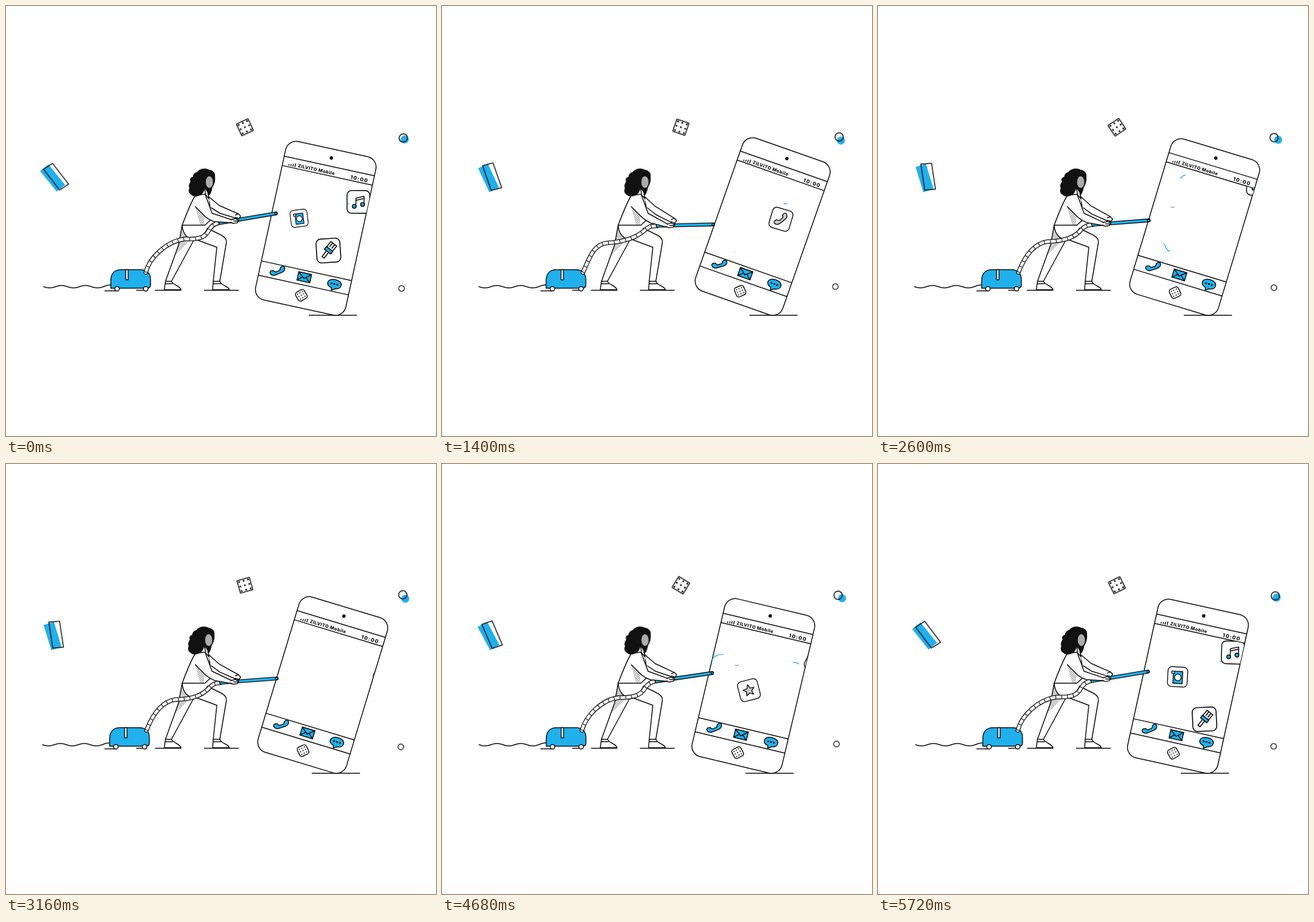
These frames come from a looping animation (720x720 px, 5760 ms). An HTML page:

```html
<!DOCTYPE html>
<html lang="en">
<head>
<meta charset="utf-8">
<title>Phone cleanup</title>
<style>
html, body { margin: 0; width: 100%; height: 100%; overflow: hidden; background: #fff; }
svg { display: block; width: 100%; height: 100%; }
.line { fill: none; stroke: #0c0c0c; stroke-width: 1.5; stroke-linecap: round; stroke-linejoin: round; }
.white { fill: #fff; }
.blue { fill: #20b0ec; }
.dots { fill: url(#dots); }
.ink { fill: #111; stroke: none; }
.flat { stroke: none; }
.flap { fill: var(--flap, #20b0ec); }
#apps { --flap: #fff; }
text { font: 800 7.6px Inter, "Open Sans", sans-serif; fill: #111; stroke: none; letter-spacing: .45px; }
.clock { font-size: 8.6px; letter-spacing: 1.2px; }

.card, .shade, .drift { animation: 5760ms infinite; }
.card { animation-name: card; }
.shade { animation-name: shade; }
.drift { animation-name: drift; }
.die { animation: die 5760ms linear infinite; }
.orbit { animation: orbit 1920ms linear infinite; }
.slow { animation-duration: 2880ms; }

@keyframes card {
  0%, 100% { transform: rotate(-37.6deg); animation-timing-function: cubic-bezier(.167, .167, .667, 1); }
  50% { transform: rotate(-8deg); animation-timing-function: cubic-bezier(.333, 0, .833, .833); }
}
@keyframes shade {
  0%, 100% { transform: rotate(-39deg); animation-timing-function: cubic-bezier(.167, .167, .667, 1); }
  50% { transform: rotate(-16.5deg); animation-timing-function: cubic-bezier(.333, 0, .833, .833); }
}
@keyframes drift {
  0%, 100% { transform: none; animation-timing-function: cubic-bezier(.167, .167, .667, 1); }
  50% { transform: translateX(var(--d)); animation-timing-function: cubic-bezier(.333, 0, .833, .833); }
}
@keyframes die { from { transform: rotate(-25deg); } to { transform: rotate(155deg); } }
@keyframes orbit { from { transform: rotate(43deg); } to { transform: rotate(403deg); } }
</style>
</head>
<body>
<svg viewBox="0 0 720 720">
  <defs>
    <pattern id="dots" width="3.4" height="3.4" patternUnits="userSpaceOnUse">
      <rect width="3.4" height="3.4" fill="#fff"/>
      <circle cx=".9" cy=".9" r=".62"/><circle cx="2.6" cy="2.6" r=".62"/>
    </pattern>
    <clipPath id="screen"><rect id="screenBox" x="-136" y="-209" width="154" height="163"/></clipPath>

    <path id="handset" d="M-13-1Q-13-5-9-4.500L-6-3.500Q-5.500-.5-3 0H3Q5.500-.5 6-3.500L9-4.500Q13-5 13-1Q12 4 6 4.500H-6Q-12 4-13-1Z"/>
    <g id="mail"><path d="M-11-7H11V7H-11Z"/><path class="flap" d="M-11-7L0 2L11-7Z"/><path d="M-11 7L-3 0M11 7L3 0"/></g>
    <g id="chat">
      <path d="M-4 7L-3 11.5L3 7.5C8 7 11.5 4 11.5 0C11.5-4.500 7-7.500 0-7.500S-11.500-4.500-11.500 0C-11.500 3.500-8.500 6-4 7Z"/>
      <g class="ink"><circle cx="-5" r="1.6"/><circle r="1.6"/><circle cx="5" r="1.6"/></g>
    </g>
    <g id="music">
      <path class="white" d="M-4 6V-6L9-9V3M-4-2.500L9-5.500"/>
      <circle cx="-6.500" cy="7" r="3"/><circle cx="6.500" cy="4" r="3"/>
    </g>
    <g id="camera">
      <path d="M-8-10H9V12H-8Z"/><path class="white" d="M-11-10h5v4h-5z"/>
      <circle class="white" r="6" cx=".5" cy="1"/>
    </g>
    <g id="brush" transform="rotate(42)">
      <path class="white" d="M-5.500-2V-13H5.500V-2M-2-12V-6M2-12V-6"/>
      <path d="M-6-3H6V2H-6Z"/><path class="white" d="M-2 2H2V13H-2Z"/>
    </g>
    <g id="folder">
      <path class="white" d="M-11 8V-9H-4L-2-7H11V8Z"/><path d="M-11-5H11V-1H-11Z"/>
      <path class="white" d="M-11 8L-9-3H12L11 8Z"/>
    </g>
    <path id="star" class="dots" d="M0-10L2.800-3.200L10-2.700L4.500 2L6.200 9L0 5.200L-6.200 9L-4.500 2L-10-2.700L-2.800-3.200Z"/>
  </defs>

  <!-- floating shapes -->
  <g class="line">
    <g transform="translate(78 288)"><rect class="shade blue flat" x="-9" y="-22" width="18" height="44"/></g>
    <g transform="translate(84 286)"><path class="card" d="M-9-23L9-21.400V22.600L-9 21Z"/></g>
    <g transform="translate(400 203)"><g class="die" id="die"><rect class="white" x="-10.700" y="-10.700" width="21.400" height="21.400"/></g></g>
    <g transform="translate(668.700 224.300)"><g class="orbit"><circle class="blue flat" cx="-1.300" r="6.700"/></g></g>
    <g transform="translate(664.300 220.200)"><g class="orbit"><circle cx="1.200" r="6.900"/></g></g>
    <g transform="translate(660.600 471.300)"><g class="orbit slow"><circle class="white" cx="2.400" r="4.700"/></g></g>
  </g>

  <!-- phone -->
  <path id="floor" class="line" d="M507.500 517.800H587"/>
  <g id="phone" class="line">
    <rect class="white" x="-136.300" y="-254.500" width="154.600" height="271.500" rx="18"/>
    <circle class="ink" cx="-58.500" cy="-239.400" r="2.900"/>
    <path d="M-136-225.500H18M-136-209.500H18M-136-46H18M-136-21.500H18"/>
    <path d="M-125.500-212v-1.500M-122-212v-2.500M-118.500-212v-3.700M-115-212v-5"/>
    <text x="-110.500" y="-212.300">ZILVITO Mobile</text>
    <text class="clock" x="-20.500" y="-212">10:00</text>
    <g class="blue">
      <use href="#handset" transform="translate(-106 -35) rotate(-35)"/>
      <use href="#mail" transform="translate(-60.300 -34.500)"/>
      <use href="#chat" transform="translate(-8.500 -34.300)"/>
    </g>
    <g id="home" transform="translate(-58.700 -4) rotate(-42)"><rect class="white" x="-8.300" y="-8.300" width="16.600" height="16.600" rx="4"/></g>
  </g>
  <g clip-path="url(#screen)"><g id="apps" class="line"></g></g>
  <g id="trails" fill="none" stroke-width="1.400"></g>

  <!-- vacuum cleaner -->
  <path class="line" d="M165.500 477H184M218.500 476H235M250 476H293M332 476H389"/>
  <g class="line drift" style="--d:-2px">
    <path d="M63 470q10 4 20 0t20 0t20 0t20 0t20 0q6-3 12-3"/>
    <path class="blue" d="M175.500 472.500V460C175.500 448 182 441.500 193 441.500H225C236 441.500 242 448 242 458V467Q242 472.500 236 472.500Z"/>
    <path class="white" d="M200.500 441.500h4v17h-4z"/>
    <circle class="white" cx="186" cy="473.500" r="3.800"/><circle class="white" cx="234" cy="473.500" r="3.800"/>
  </g>

  <!-- person -->
  <g class="line">
    <path class="white flat" d="M295 367L289 400L267 462H277L314 393L353 404L347 461H358L369 394Q368 387 360 383L337 372Z"/>
    <path class="dots flat" d="M295 370L287 405L282 418L302 399L311 391Q297 387 295 370Z"/>
    <path d="M295 367L289 400L267 461M315 391L277 461M337 372L361 384Q370 389 369 396L358 461M318 391L353 404L347 461"/>
    <path class="white" d="M295 367C296 382 304 390 314 391Q328 391 337 373"/>
    <path class="white" d="M267 461L265 475H293C291 468 281 468 277 461ZM347 461L346 475H374C372 468 361 469 358 461Z"/>
    <path d="M266.500 465H279M347 465H360"/>
    <path class="white" d="M317 317Q309 330 295 367H333L344 357L340 322L334 315Z"/>
    <path class="dots flat" d="M316.500 336L333 350L331 366H325Z"/>
    <path id="farArm" class="white"/>
    <g class="drift" style="--d:-1.200px">
      <path class="ink" d="M320 278C324 272 334 271 340 274C347 275 351 280 350 285C351 292 349 299 346 303C345 306 344 312 342 315C340 318 337 319 336 318L333 306C331 312 328 317 322 318C318 320 313 319 310 316C306 314 305 309 307 305C305 301 307 297 309 294C307 290 309 287 313 286C313 282 316 279 320 278Z"/>
      <ellipse cx="340.500" cy="294.800" rx="6" ry="9.900" fill="#adadad" stroke="none"/>
    </g>
    <path class="white" d="M333 305L334 316L340 323L338 314"/>
  </g>

  <!-- hose, wand, near arm -->
  <g fill="none" stroke-linecap="round">
    <path class="hose" stroke="#111" stroke-width="7.400"/>
    <path class="hose" stroke="#fff" stroke-width="4.800"/>
    <path class="hose" stroke="#111" stroke-width="5" stroke-linecap="butt" stroke-dasharray="1.200 8.600"/>
    <path class="wand" stroke="#111" stroke-width="6.400"/>
    <path class="wand" stroke="#20b0ec" stroke-width="3.700"/>
    <circle id="tip" r="2" fill="#20b0ec" stroke="#111" stroke-width="1.300"/>
  </g>
  <path id="nearArm" class="line white"/>
  <path id="hands" class="line white"/>
</svg>

<script>
const LOOP = 5760, SWING = 960;
const TIP = [455, 349];
const NS = "http://www.w3.org/2000/svg";
const $ = id => document.getElementById(id);
const mix = (a, b, k) => a + (b - a) * k;

function add(parent, tag, attrs) {
  const el = document.createElementNS(NS, tag);
  for (const key in attrs) el.setAttribute(key, attrs[key]);
  return parent.appendChild(el);
}

function dotGrid(parent, gap, r) {
  for (let i = 0; i < 9; i++)
    add(parent, "circle", { class: "ink", cx: (i % 3 - 1) * gap, cy: (Math.floor(i / 3) - 1) * gap, r });
}
dotGrid($("die"), 7.8, 1.6);
dotGrid($("home"), 4.6, 1);

// glyph, size, arrival, duration, start, control, first and last angle
const apps = [
  ["camera", 37, 150, 600, [642, 350], [520, 366], 57, -57],
  ["music", 38, 480, 640, [600, 268], [598, 414], 3, -40],
  ["brush", 40, 440, 560, [560, 470], [515, 308], -2, -40],
  ["star", 32, 870, 600, [642, 350], [520, 369], 28, -32],
  ["mail", 34, 1130, 600, [640, 378], [518, 391], 28, -15],
  ["handset", 35, 1820, 600, [640, 350], [508, 367], 20, -15],
  ["folder", 34, 2380, 600, [640, 378], [519, 391], 20, -25],
  ["music", 38, 3160, 600, [643, 283], [600, 400], 3, -40],
  ["chat", 34, 3745, 600, [642, 350], [520, 366], 28, -5],
  ["folder", 34, 4140, 600, [640, 385], [499, 388], 18, -15],
  ["star", 34, 4920, 600, [645, 400], [515, 394], 0, -40],
  ["mail", 36, 5220, 600, [646, 325], [560, 355], 27, -20]
].map(([glyph, size, end, span, from, via, r0, r1]) => {
  const el = add($("apps"), "g", {});
  add(el, "rect", { class: "white", x: -18, y: -18, width: 36, height: 36, rx: 7 });
  const use = add(el, "use", { href: "#" + glyph, class: glyph === "handset" ? "dots" : "blue" });
  if (glyph === "handset") use.setAttribute("transform", "rotate(-55)");
  return { el, size, start: end - span, span, from, via, r0, r1 };
});

function drawApp(app, t) {
  const u = ((t - app.start) % LOOP + LOOP) % LOOP / app.span;
  app.el.style.display = u < 1 ? "" : "none";
  if (u >= 1) return;
  const [x, y] = [0, 1].map(i =>
    (1 - u) ** 2 * app.from[i] + 2 * u * (1 - u) * app.via[i] + u * u * TIP[i]);
  const near = Math.min(1, Math.hypot(x - TIP[0], y - TIP[1]) / 70);
  const scale = app.size / 36 * (1 - (1 - near) ** 2);
  const turn = mix(app.r0, app.r1, u * u);
  app.el.setAttribute("transform", `translate(${x} ${y}) rotate(${turn}) scale(${scale})`);
}

// moment of full length, path
const trails = [
  [680, "M537 280Q531 285 521 284"], [680, "M449 332l2-2"], [680, "M578 331h-6"],
  [680, "M534 384q-2-5-4-7t-4-5"], [680, "M461 403l-2 6"],
  [1400, "M578 331l-6 .5"], [1400, "M541 275v1"], [1400, "M489 411h1"],
  [2600, "M515 283q-6 1-8 6"], [2600, "M497 337h-7", "#999"], [2600, "M489 411q-6-3-7-7t-4-6"],
  [3720, "M515 283q-6 1-8 6"], [3720, "M518 346l-10-6"], [3720, "M489 411q-5-2-9-8"],
  [3720, "M465 425q1-4-3-9t-2-13"],
  [4680, "M471 319q-13-1-20 10"], [4680, "M598 335q-5-3-10-3"], [4680, "M497 337h-7", "#999"],
  [5720, "M575 331h-3"]
].map(([at, d, stroke = "#20b0ec"]) =>
  ({ at, el: add($("trails"), "path", { d, stroke, pathLength: 1 }) }));

function drawTrail({ at, el }, t) {
  const k = (((t - at + LOOP / 2) % LOOP + LOOP) % LOOP - LOOP / 2) / 160;
  el.style.display = Math.abs(k) < 1 ? "" : "none";
  const a = Math.max(0, k), b = Math.min(1, 1 + k);
  el.setAttribute("stroke-dasharray", `${Math.max(0, b - a)} 3`);
  el.setAttribute("stroke-dashoffset", -a);
}

const hoseLow = [234, 446, 240, 422, 268, 394, 300, 390, 322, 391, 334, 388, 340, 375, 344, 368, 350, 364, 358, 362.5];
const hoseHigh = [236, 446, 246, 425, 252, 400, 275, 397, 306, 395, 325, 388, 340, 375, 348, 368, 352, 368, 360, 368.5];

function setPath(selector, d) {
  document.querySelectorAll(selector).forEach(el => el.setAttribute("d", d));
}

function drawSwing(s) {
  const pose = `translate(${551 + 2.2 * s} 500.8) rotate(${12.3 + 7.2 * s})`;
  $("phone").setAttribute("transform", pose);
  $("screenBox").setAttribute("transform", pose);
  $("floor").setAttribute("transform", `translate(${8 * s} 0)`);

  const p = hoseLow.map((v, i) => mix(v, hoseHigh[i], s));
  setPath(".hose", `M${p.slice(0, 2)}C${p.slice(2)}`);
  const tip = [mix(452, 454, s), mix(347.3, 366, s)];
  setPath(".wand", `M${mix(359, 361, s)} ${mix(363, 368, s)}L${tip}`);
  $("tip").setAttribute("cx", tip[0]);
  $("tip").setAttribute("cy", tip[1]);

  const h = 7.5 * s;
  setPath("#farArm", `M338 318L357 ${334 + h * .2}L389 ${348 + h}L384 ${355 + h}L358 ${347 + h * .3}L344 338`);
  setPath("#nearArm", `M334 317L345 347L378 ${358 + h}V${363 + h}L349 ${361 + h * .3}Q337 357 331 350L317 336`);
  setPath("#hands", `M384 ${350 + h}L389 ${348 + h}L393 ${352 + h}L390 ${356 + h}L384 ${354 + h}`
    + `M377 ${358 + h}L384 ${356 + h}L390 ${359 + h}L387 ${363 + h}L380 ${364 + h}L376 ${362 + h}M381 ${360 + h}H389`);
}

const start = performance.now();
function draw() {
  const t = (performance.now() - start) % LOOP;
  drawSwing((1 - Math.cos(2 * Math.PI * t / SWING)) / 2);
  apps.forEach(app => drawApp(app, t));
  trails.forEach(trail => drawTrail(trail, t));
  requestAnimationFrame(draw);
}
draw();
</script>
</body>
</html>
```
